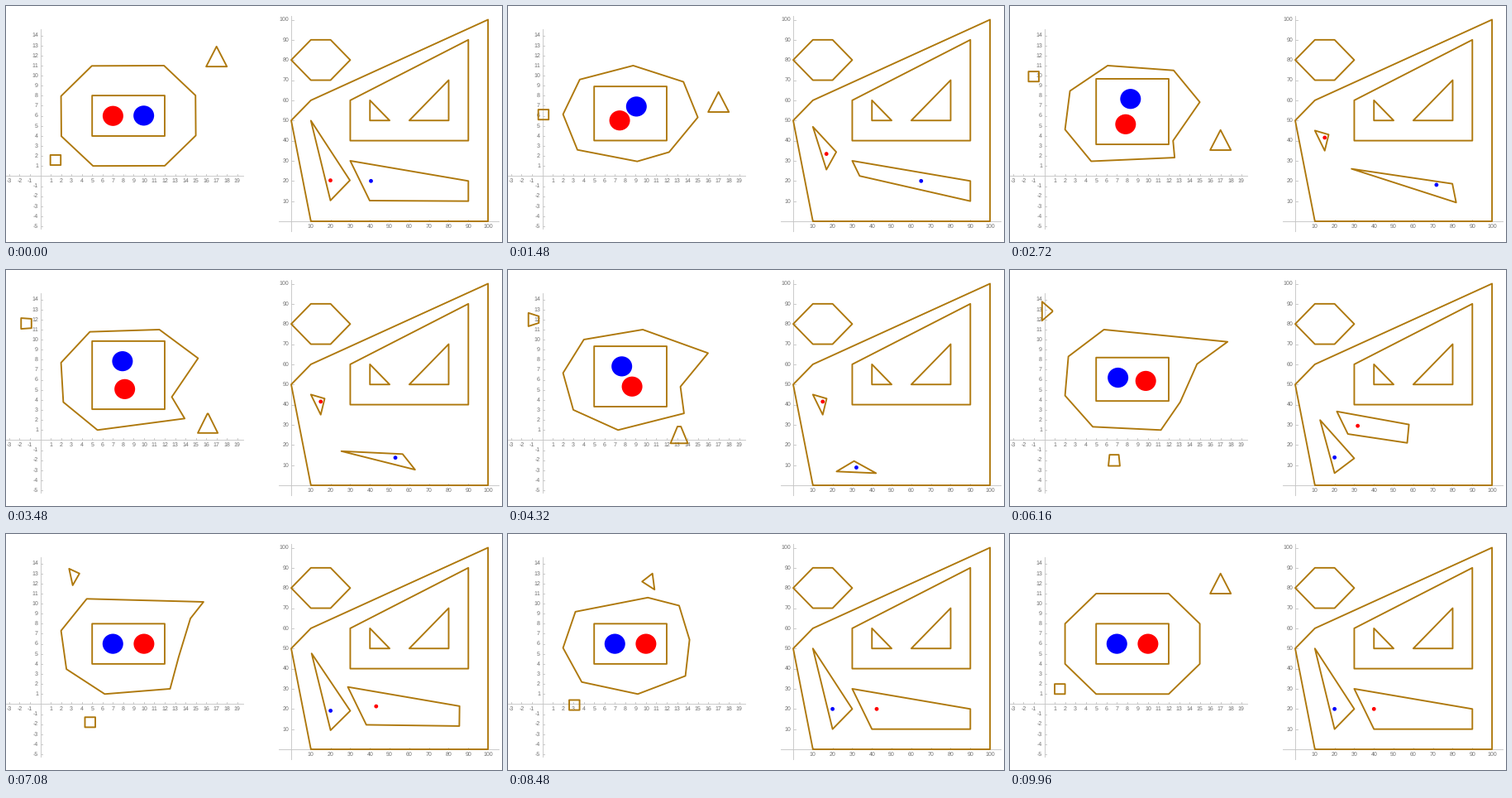
Write a matplotlib script that moves like this. It is 600x285 px and loops after 10 s.

```python
import numpy as np
import matplotlib.pyplot as plt
from matplotlib.animation import FuncAnimation
from matplotlib.patches import Ellipse, Polygon

W, H, DPI = 600, 285, 100
FRAMES, STEP_MS = 250, 40
PT = 72 / DPI                       # points per pixel
LEAD = 0.8                          # the motion is already under way at the start

GOLD, AXIS, LABEL = "#ae780c", "#c6c6c6", "#6c6c6c"
RED, BLUE = "#ff0000", "#0000ff"

plt.rcParams["font.family"] = "Liberation Sans"
plt.rcParams["text.hinting"] = "none"
plt.rcParams["text.hinting_factor"] = 1
fig = plt.figure(figsize=(W / DPI, H / DPI), dpi=DPI, facecolor="white")
ax = fig.add_axes([0, 0, 1, 1])
ax.set_xlim(0, W)
ax.set_ylim(H, 0)
ax.axis("off")


def morph(keys, t):
    """Linear path through the keys, one unit of t per segment."""
    t = min(t, len(keys) - 1)
    k = min(int(t), len(keys) - 2)
    a, b = np.array(keys[k], float), np.array(keys[k + 1], float)
    return a + (b - a) * (t - k)


class Plane:
    """A coordinate system on the stage whose items move segment by segment."""

    def __init__(self, x0, y0, sx, sy, steps):
        self.origin = np.array([x0, y0])
        self.scale = np.array([sx, -sy])
        self.steps = steps          # frames per segment
        self.moving = []

    def px(self, points):
        return self.origin + np.asarray(points, float) * self.scale

    def axes(self, x_span, y_span, x_ticks, y_ticks):
        x0, y0 = self.origin
        style = dict(color=AXIS, lw=0.9 * PT, zorder=1)
        text = dict(color=LABEL, fontsize=6.6 * PT, va="center", zorder=1.5)
        ax.plot(x_span, [y0, y0], **style)
        ax.plot([x0, x0], y_span, **style)
        for n in filter(None, x_ticks):
            x = self.px((n, 0))[0]
            ax.plot([x, x], [y0, y0 - 2.5], **style)
            ax.text(x, y0 + 6, str(n), ha="center", **text)
        for n in filter(None, y_ticks):
            y = self.px((0, n))[1]
            ax.plot([x0, x0 + 2.5], [y, y], **style)
            ax.text(x0 - 2.5, y, str(n), ha="right", **text)

    def outline(self, *keys):
        shape = Polygon(self.px(keys[0]), closed=True, fill=False, ec=GOLD,
                        lw=1.9 * PT, joinstyle="round", snap=False, zorder=2)
        ax.add_patch(shape)
        if len(keys) > 1:
            self.moving.append((keys, shape.set_xy))

    def ball(self, color, rx, ry, *keys):
        ball = Ellipse(self.px(keys[0]), 2 * rx, 2 * ry, fc=color, ec="none",
                       zorder=3)
        ax.add_patch(ball)
        self.moving.append((keys, ball.set_center))

    def update(self, i):
        for keys, place in self.moving:
            place(self.px(morph(keys, (i + LEAD) / self.steps)))


def box(x, y, w=1, h=1):
    return [(x, y), (x + w, y), (x + w, y + h), (x, y + h)]


def triangle(x, y):
    """Triangle with a doubled apex, so that it can open into a box."""
    return [(x, y), (x + 2, y), (x + 1, y + 2), (x + 1, y + 2)]


def chamfered(x0, y0, x1, y1, c):
    return [(x0 + c, y0), (x1 - c, y0), (x1, y0 + c), (x1, y1 - c),
            (x1 - c, y1), (x0 + c, y1), (x0, y1 - c), (x0, y0 + c)]


def rolled(points, k, **bent):
    """Each vertex moves k places on; bent ones such as v0 go elsewhere."""
    out = points[k:] + points[:k]
    for name, point in bent.items():
        out[int(name[1:])] = point
    return out


left = Plane(41.5, 205.4, 12.54, 12.13, steps=81.8)
right = Plane(345, 260, 2.381, 2.435, steps=60.5)
left.axes((0, 287), (28, 269), range(-3, 20), range(-5, 15))
right.axes((330, 596), (12, 272), range(10, 101, 10), range(10, 101, 10))

# Left plane: the room's vertices chase each other while the two small
# shapes swap places and the balls circle in the inner box.
room = chamfered(2, 1, 15, 11, 3)
left.outline(room,
             rolled(room, 1, v0=(14, 2), v1=(12.5, 4)),
             rolled(room, 2, v0=(13, 4), v2=(18, 10)),
             rolled(room, 3))
left.outline(box(5, 4, 7, 4), box(5, 3, 7, 7), box(5, 4, 7, 4))
left.outline(box(1, 1), box(-2, 11), [(0, 12), (1, 13), (1, 13), (0, 14)],
             rolled(triangle(16, 11), 1))
left.outline(triangle(16, 11), triangle(16, 1), box(5, -3), box(1, 1))
left.ball(RED, 12.5, 12.1, (7, 6), (8, 5), (10, 6))
left.ball(BLUE, 12.5, 12.1, (10, 6), (8, 8), (7, 6))

# Right plane: fixed obstacles
right.outline([(0, 50), (10, 60), (100, 100), (100, 0), (10, 0)])
right.outline(chamfered(0, 70, 30, 90, 10))
right.outline([(30, 60), (90, 90), (90, 40), (30, 40)])
right.outline([(40, 60), (50, 50), (40, 50)])
right.outline([(60, 50), (80, 70), (80, 50)])

# Right plane: the two cells trade shapes, each carrying its dot.
spike = [(20, 10), (20, 10), (30, 20), (10, 50)]
blade = [(30, 30), (40, 10), (90, 10), (90, 20)]
chip = [(10, 45), (10, 45), (15, 35), (17, 43)]
right.outline(rolled(spike, 3, v1=(10, 50), v2=(20, 10), v3=(30, 20)),
              chip, chip, blade)
right.outline(blade, rolled(blade, 0, v1=(30, 30)),
              [(20, 1), (20, 1), (30, 5), (16, 10)], spike)
right.ball(RED, 2.4, 2.4,
           (20, 20), (15, 41.5), (15, 41.5), (45, 20), (40, 20))
right.ball(BLUE, 2.4, 2.4, (40, 20), (80, 20), (20, 6), (20, 20))


def draw(i):
    left.update(i)
    right.update(i)
    return ax.patches


anim = FuncAnimation(fig, draw, frames=FRAMES, interval=STEP_MS,
                     init_func=lambda: draw(0), repeat=True, repeat_delay=0)
plt.show()
```
